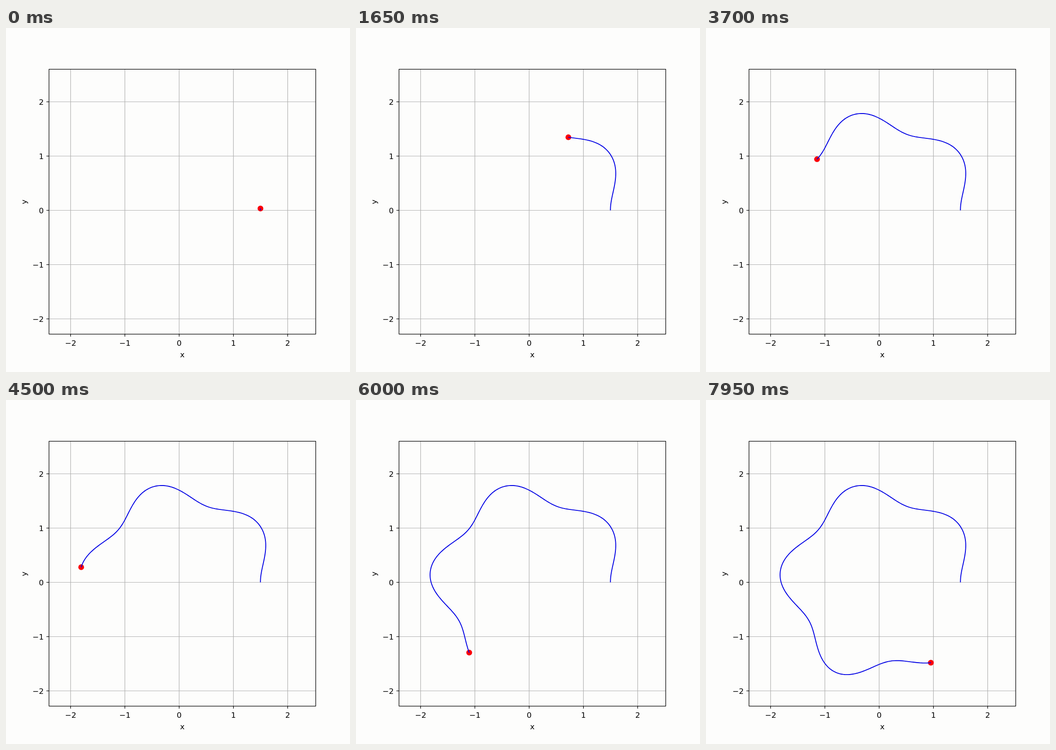
Write an HTML page with a canvas that moves like this. It is 748 px wide and 748 px high and loops after 8 s.

```html
<!DOCTYPE html>
<html lang="en">
<head>
<meta charset="utf-8">
<title>Orbit trace</title>
<style>
  html, body { margin: 0; width: 100%; height: 100%; overflow: hidden; background: #fdfdfc; }
  canvas { display: block; width: 748px; height: 748px; }
</style>
</head>
<body>
<canvas id="stage" width="748" height="748"></canvas>
<script>
const ctx = document.getElementById('stage').getContext('2d');
const SIZE = 748, LOOP = 8000, STEP = 50;
const BOX = { left: 93.5, top: 89.5, right: 673.5, bottom: 665.5 };
const LEAD = 0.56; // steps already travelled when the loop begins
const TICKS = [-2, -1, 0, 1, 2];

const px = x => 376.5 + 117.9 * x;
const py = y => 396.5 - 117.95 * y;
const snap = v => Math.floor(v) + 0.5;

// Slowly widening radial oscillation around a turning orbit.
function orbit(t) {
  const phase = 0.1699 * t;
  const swing = 0.1575 + 0.00022 * t;
  const r = 1.674 - swing * Math.cos(phase) - 0.0175 * Math.cos(2 * phase);
  const angle = 0.03284 * t + (0.042 + 0.00004 * t) * Math.sin(phase);
  return [px(r * Math.cos(angle)), py(r * Math.sin(angle))];
}

function line(x1, y1, x2, y2) {
  ctx.beginPath();
  ctx.moveTo(x1, y1);
  ctx.lineTo(x2, y2);
  ctx.stroke();
}

function drawAxes() {
  ctx.fillStyle = '#fdfdfc';
  ctx.fillRect(0, 0, SIZE, SIZE);

  ctx.lineWidth = 1.2;
  ctx.strokeStyle = '#b0b0b0';
  for (const v of TICKS) {
    const x = snap(px(v)), y = snap(py(v));
    line(x, BOX.top, x, BOX.bottom);
    line(BOX.left, y, BOX.right, y);
  }
}

function drawFrame() {
  ctx.strokeStyle = '#000';
  ctx.fillStyle = '#000';
  ctx.lineWidth = 1.25;
  ctx.font = '16.6px "DejaVu Sans", sans-serif';
  ctx.textBaseline = 'alphabetic';
  for (const v of TICKS) {
    const x = snap(px(v)), y = snap(py(v));
    const label = String(v).replace('-', '\u2212');
    line(x, BOX.bottom, x, BOX.bottom + 5.5);
    line(BOX.left - 5.5, y, BOX.left, y);
    ctx.textAlign = 'center';
    ctx.fillText(label, x, 691);
    ctx.textAlign = 'right';
    ctx.fillText(label, 82, y + 6.3);
  }
  ctx.strokeRect(BOX.left, BOX.top, BOX.right - BOX.left, BOX.bottom - BOX.top);

  ctx.textAlign = 'center';
  ctx.fillText('x', 383.5, 715.5);
  ctx.save();
  ctx.translate(44.5, 378);
  ctx.rotate(-Math.PI / 2);
  ctx.fillText('y', 0, 0);
  ctx.restore();
}

function drawTrace(end) {
  const [x, y] = orbit(end);
  ctx.fillStyle = '#fa0008';
  ctx.beginPath();
  ctx.arc(x, y, 6.25, 0, 2 * Math.PI);
  ctx.fill();

  ctx.strokeStyle = '#0000e4';
  ctx.lineWidth = 1.9;
  ctx.lineJoin = 'round';
  ctx.beginPath();
  ctx.moveTo(...orbit(0));
  for (let t = 0.5; t < end; t += 0.5) ctx.lineTo(...orbit(t));
  ctx.lineTo(x, y);
  ctx.stroke();
}

function render(now) {
  const step = Math.floor((now % LOOP) / STEP);
  drawAxes();
  drawTrace(step + LEAD);
  drawFrame();
}

const start = performance.now();
function tick() {
  render(performance.now() - start);
  requestAnimationFrame(tick);
}
tick();
</script>
</body>
</html>
```
